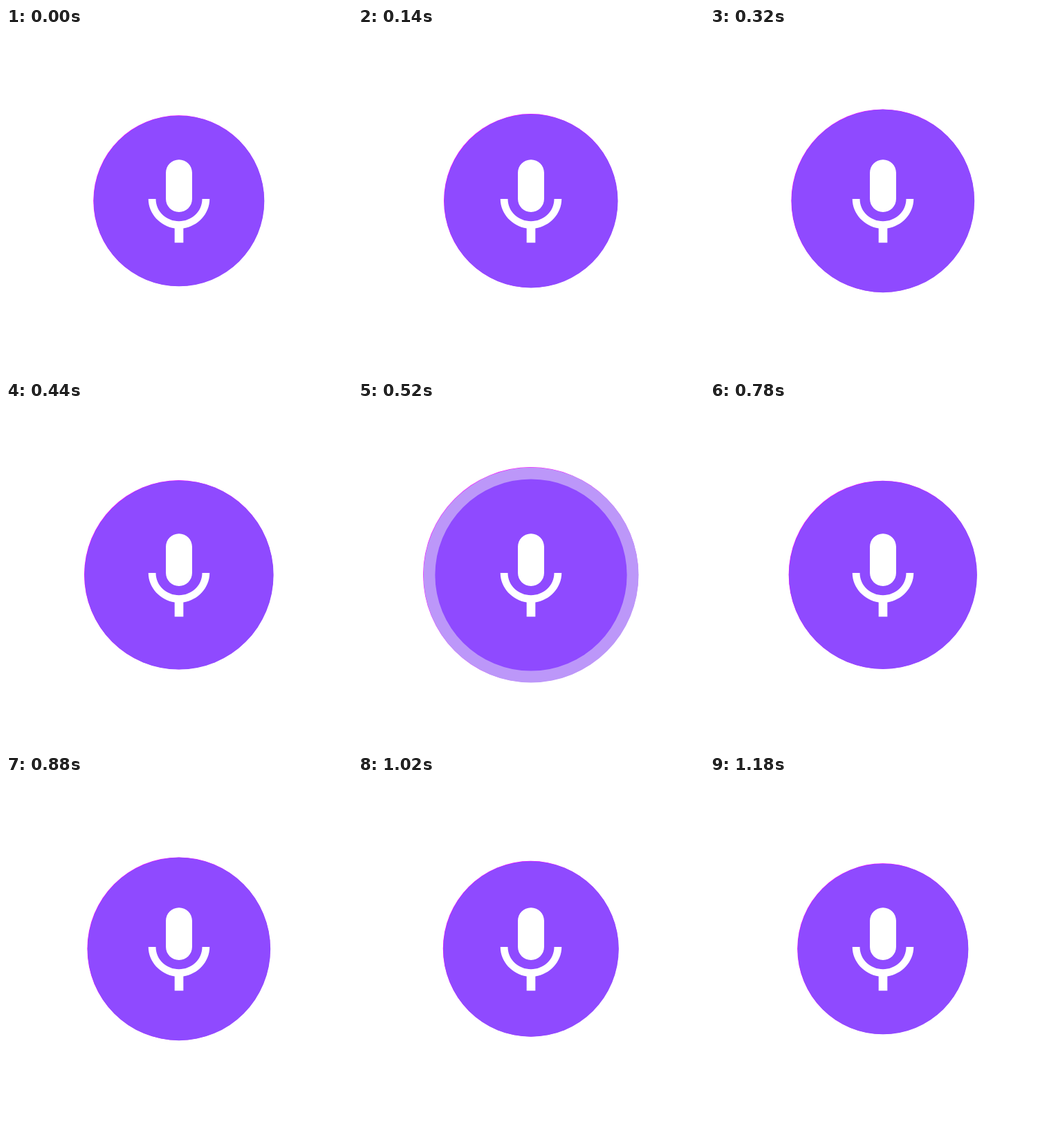
Write an HTML page that moves like this. It is 500x500 px and loops after 1.2 s.

```html
<!DOCTYPE html>
<html lang="en">
<head>
<meta charset="utf-8">
<title>Microphone pulse</title>
<style>
  html, body { margin: 0; width: 100%; height: 100%; overflow: hidden; background: #fff; }
  svg { display: block; width: 100vw; height: 100vh; }
  .fringe { fill: #f0f; }
  .ring { fill: #bc97f9; }
  .disc { fill: #8f4aff; }
  .mic { fill: #fff; }
</style>
</head>
<body>
<svg viewBox="0 0 500 500">
  <g class="wave">
    <circle class="fringe" cx="249.6" cy="249.6" r="0"/>
    <circle class="ring" cx="250" cy="250" r="0"/>
  </g>
  <g class="pulse">
    <circle class="fringe edge" cx="249.6" cy="249.6" r="123.3"/>
    <circle class="disc" cx="250" cy="250" r="123.3"/>
  </g>
  <path class="mic" transform="translate(174.16 177.5) scale(6.32)"
    d="M12 14c1.66 0 3-1.34 3-3V5c0-1.66-1.34-3-3-3S9 3.34 9 5v6c0 1.66 1.34 3 3 3z
       M17.3 11c0 3-2.54 5.1-5.3 5.1S6.7 14 6.7 11H5c0 3.41 2.72 6.23 6 6.72V21h2v-3.28c3.28-.48 6-3.3 6-6.72z"/>
</svg>
<script>
  const LOOP = 1200;
  const EASE = 'cubic-bezier(.333, 0, .667, 1)';
  // One step per 20 ms; the small lead keeps steps on their boundaries.
  const timing = { duration: LOOP, iterations: Infinity, delay: -1, easing: 'steps(60, end)' };

  const animate = (selector, steps) => {
    const frames = steps.map(([ms, props]) => ({ offset: ms / LOOP, ...props }));
    document.querySelectorAll(selector).forEach(el => el.animate(frames, timing));
  };

  animate('.pulse circle', [
    [0, { r: '123.3px', easing: EASE }],
    [600, { r: '139.4px', easing: EASE }],
    [1200, { r: '123.3px' }]
  ]);

  animate('.wave circle', [
    [0, { r: '10px' }],
    [520, { r: '155.5px' }],
    [560, { r: '166.8px' }],
    [1200, { r: '166.8px' }]
  ]);

  animate('.wave', [
    [0, { opacity: 1 }],
    [570, { opacity: 1 }],
    [570, { opacity: 0 }],
    [1200, { opacity: 0 }]
  ]);

  // The fringe gives way to the ring once the wave passes the disc.
  animate('.edge', [
    [0, { opacity: 1 }],
    [450, { opacity: 1 }],
    [450, { opacity: 0 }],
    [570, { opacity: 0 }],
    [570, { opacity: 1 }],
    [1200, { opacity: 1 }]
  ]);
</script>
</body>
</html>
```
